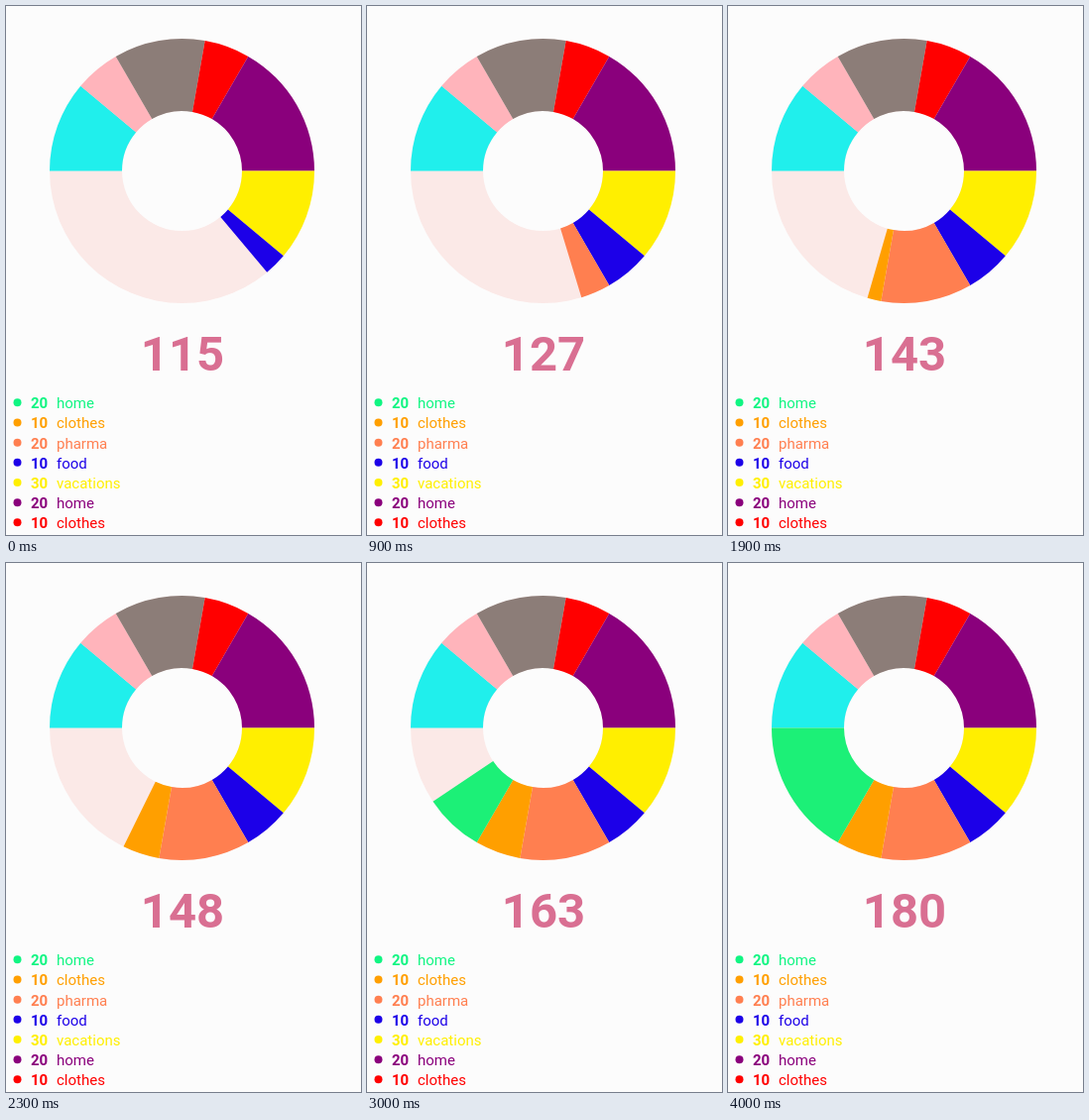
Write an HTML page with a canvas that moves like this. It is 358 px wide and 534 px high and loops after 5.5 s.

```html
<!DOCTYPE html>
<html lang="en">
<head>
<meta charset="utf-8">
<title>Spending ring</title>
<style>
  html, body { margin: 0; width: 100%; height: 100%; overflow: hidden; background: #fcfcfc; }
  canvas { display: block; }
</style>
</head>
<body>
<canvas id="stage" width="358" height="534"></canvas>
<script>
const ctx = document.getElementById('stage').getContext('2d');

const LOOP = 5500, TICK = 100;
const CX = 177.5, CY = 166.5, OUTER = 133.5, INNER = 60.5;
const GREEN = '#1cf077', ORANGE = '#ff9f00', CORAL = '#ff7f50', BLUE = '#1c00e8',
      YELLOW = '#ffef00', PURPLE = '#8a007c', RED = '#ff0000';

// Clockwise from the left; 180 units make a full turn.
const slices = [
  [20, '#20efec'], [10, '#ffb4bb'], [20, '#8c7d78'], [10, RED], [30, PURPLE],
  [20, YELLOW], [10, BLUE], [20, CORAL], [10, ORANGE], [30, GREEN]
];
const FIRST_MOVING = 6, FIRST_START = -295, PERIOD = 1015, GROW = 1000;

const legend = [
  [20, 'home', '#10f582'], [10, 'clothes', ORANGE], [20, 'pharma', CORAL],
  [10, 'food', BLUE], [30, 'vacations', YELLOW], [20, 'home', PURPLE], [10, 'clothes', RED]
];

const decelerate = u => 1 - (1 - u) ** 2;
const clamp = u => Math.min(1, Math.max(0, u));

function growth(i, t) {
  if (i < FIRST_MOVING) return 1;
  const start = FIRST_START + (i - FIRST_MOVING) * PERIOD;
  return decelerate(clamp((t - start) / GROW));
}

function ring(from, to, color) {
  const a = Math.PI * (1 + from / 90), b = Math.PI * (1 + to / 90);
  ctx.fillStyle = color;
  ctx.beginPath();
  ctx.arc(CX, CY, OUTER, a, b);
  ctx.arc(CX, CY, INNER, b, a, true);
  ctx.fill();
}

function text(str, x, y, font, color, align = 'left') {
  ctx.font = font + ' Roboto, sans-serif';
  ctx.fillStyle = color;
  ctx.textAlign = align;
  ctx.fillText(str, x, y);
}

function drawLegend() {
  legend.forEach(([value, label, color], i) => {
    const y = 406.2 + i * 20.17;
    ctx.fillStyle = color;
    ctx.beginPath();
    ctx.arc(11.5, y - 5.9, 4, 0, 2 * Math.PI);
    ctx.fill();
    text(value, 25, y, 'bold 15px', color);
    text(label, 51, y, '15px', color);
  });
}

function draw(t) {
  ctx.fillStyle = '#fcfcfc';
  ctx.fillRect(0, 0, 358, 534);

  let total = 0;
  ring(0, 180, '#fbe9e7');
  slices.forEach(([value, color], i) => {
    const size = value * growth(i, t);
    if (size > 0) ring(total, total + size, color);
    total += size;
  });

  text(Math.round(total), 178, 367.5, 'bold 49px', '#d96f92', 'center');
  drawLegend();
}

function frame() {
  const t = performance.now() % LOOP;
  draw(Math.floor(t / TICK) * TICK);
  requestAnimationFrame(frame);
}
frame();
</script>
</body>
</html>
```
